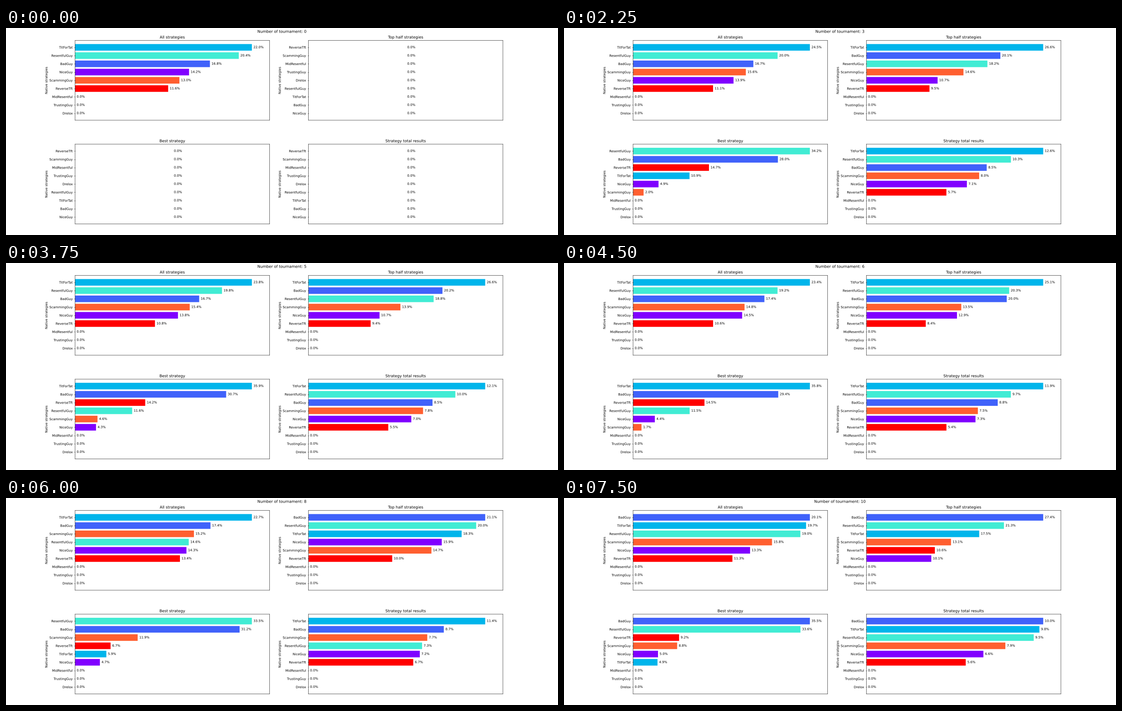
A matplotlib script for the animation above (8000 ms loop, 1222 by 458 pixels).

```python
import matplotlib.pyplot as plt
import numpy as np
from matplotlib.animation import FuncAnimation
from matplotlib.patheffects import Normal
from matplotlib.text import Text

W, H, DPI = 1222, 458, 64
K = W / 24 / DPI  # type scale for a 24 inch wide layout
LAST = 10         # last round

plt.rcParams.update({
    "font.family": "DejaVu Sans",
    "font.size": 10 * K,
    "axes.titlesize": 12 * K,
    "axes.titlepad": 6 * K,
    "axes.labelpad": 4 * K,
    "axes.linewidth": 0.9 * K,
    "ytick.major.width": 0.9 * K,
    "ytick.major.size": 3.5 * K,
    "ytick.major.pad": 3.5 * K,
    "text.hinting": "none",
})

NAMES = ["NiceGuy", "BadGuy", "TitForTat", "ResentfulGuy", "Drelox",
         "TrustingGuy", "MidResentful", "ScammingGuy", "ReverseTft"]
COLORS = plt.cm.rainbow(np.linspace(0, 1, len(NAMES)))


def trend(start, end, *bumps):
    """Straight drift plus bumps (round, height) that halve one round away."""
    def share(rnd):
        drift = start + (end - start) * rnd / LAST
        return drift + sum(h * 0.5 ** (rnd - c) ** 2 for c, h in bumps)
    return share


ALL = dict(
    NiceGuy=trend(14.2, 13.3, (7, 1.6)),
    BadGuy=trend(16.8, 16.4, (7, 1.7), (10.7, 5.2)),
    TitForTat=trend(25.6, 22, (-0.3, -3.8), (10.4, -2.6)),
    ResentfulGuy=trend(20.4, 19.2, (7.8, -5)),
    ScammingGuy=trend(13, 15.8, (3.8, 2.8)),
    ReverseTft=trend(11.6, 9.9, (8.7, 4.5)),
)
TOP_HALF = dict(
    NiceGuy=trend(11, 10, (7.3, 8)),
    BadGuy=trend(19, 18.8, (4, 2.4), (7.3, 3), (10.6, 11)),
    TitForTat=trend(26.4, 27, (7.6, -9.5), (10.6, -12)),
    ResentfulGuy=trend(18.5, 21.8, (4, -2.6), (8.7, -1.6)),
    ScammingGuy=trend(15.7, 12, (8.8, 3)),
    ReverseTft=trend(9, 10.6, (6.4, -1.7)),
)
BEST = dict(
    NiceGuy=trend(3.5, 5, (1, 15.6)),
    BadGuy=trend(26.5, 35.5, (1, -18.6), (7, -5)),
    TitForTat=trend(7, 4.9, (4, 8.5), (5.6, 33)),
    ResentfulGuy=trend(35, 33.6, (5.5, -27)),
    ScammingGuy=trend(1.5, 0.2, (4.5, 4.4), (8.9, 20)),
    ReverseTft=trend(13, 15.5, (1, 15), (8.9, -14.5)),
)


def scaled(share):
    """Running total: about half of the overall share, slowly falling."""
    return lambda rnd: share(rnd) * (0.518 - 0.002 * rnd)


TOTAL = {name: scaled(share) for name, share in ALL.items()}


class Panel:
    """Ranked bar chart that rescales to its leader."""

    def __init__(self, fig, rect, title, trends, first=1):
        self.trends, self.first = trends, first
        self.ax = ax = fig.add_axes(rect)
        n = len(NAMES)
        ax.set_title(title)
        ax.set_ylabel("Native strategies")
        ax.set_xticks([])
        ax.set_yticks(range(n))
        ax.set_ylim(-0.84, n - 0.16)
        ax.spines[:].set_snap(False)
        self.bars = ax.barh(range(n), np.zeros(n), height=0.8)
        for bar in self.bars:
            bar.set_snap(False)
        self.notes = [
            ax.annotate("", (0, y), xytext=(5 * K, 0),
                        textcoords="offset points", va="center")
            for y in range(n)
        ]

    def shares(self, rnd):
        if rnd < self.first:
            return np.zeros(len(NAMES))
        return np.array([self.trends[n](rnd) if n in self.trends else 0.0
                         for n in NAMES])

    def show(self, rnd):
        vals = self.shares(rnd)
        order = np.argsort(vals, kind="stable")
        for bar, note, i in zip(self.bars, self.notes, order):
            bar.set_width(vals[i])
            bar.set_facecolor(COLORS[i])
            note.xy = (vals[i], note.xy[1])
            note.set_text(f"{vals[i]:.1f}%")
        self.ax.set_yticklabels([NAMES[i] for i in order])
        peak = vals.max()
        self.ax.set_xlim((0, 1.1 * peak) if peak else (-1, 1))


fig = plt.figure(figsize=(W / DPI, H / DPI), dpi=DPI, facecolor="white")
heading = fig.text(0.5, 1 - 10.6 / H, "", ha="center", va="baseline",
                   fontsize=12 * K)

PW, PH = 430.5, 176.5
LEFT, RIGHT = 152.95, 669.5
UPPER, LOWER = 27.5, 257.0


def rect(x, y):
    return [x / W, 1 - (y + PH) / H, PW / W, PH / H]


panels = [
    Panel(fig, rect(LEFT, UPPER), "All strategies", ALL, first=0),
    Panel(fig, rect(RIGHT, UPPER), "Top half strategies", TOP_HALF),
    Panel(fig, rect(LEFT, LOWER), "Best strategy", BEST),
    Panel(fig, rect(RIGHT, LOWER), "Strategy total results", TOTAL),
]

# Text drawn as outlines keeps its sub-pixel position
for text in fig.findobj(Text):
    text.set_path_effects([Normal()])

STEP, LOOP, HOLD = 250, 8000, 3  # each round stays for HOLD steps


def update(i):
    rnd = i // HOLD
    heading.set_text(f"Number of tournament: {rnd}")
    for panel in panels:
        panel.show(rnd)
    return []


anim = FuncAnimation(fig, update, frames=LOOP // STEP, interval=STEP,
                     repeat=True, repeat_delay=0, blit=False)
plt.show()
```
